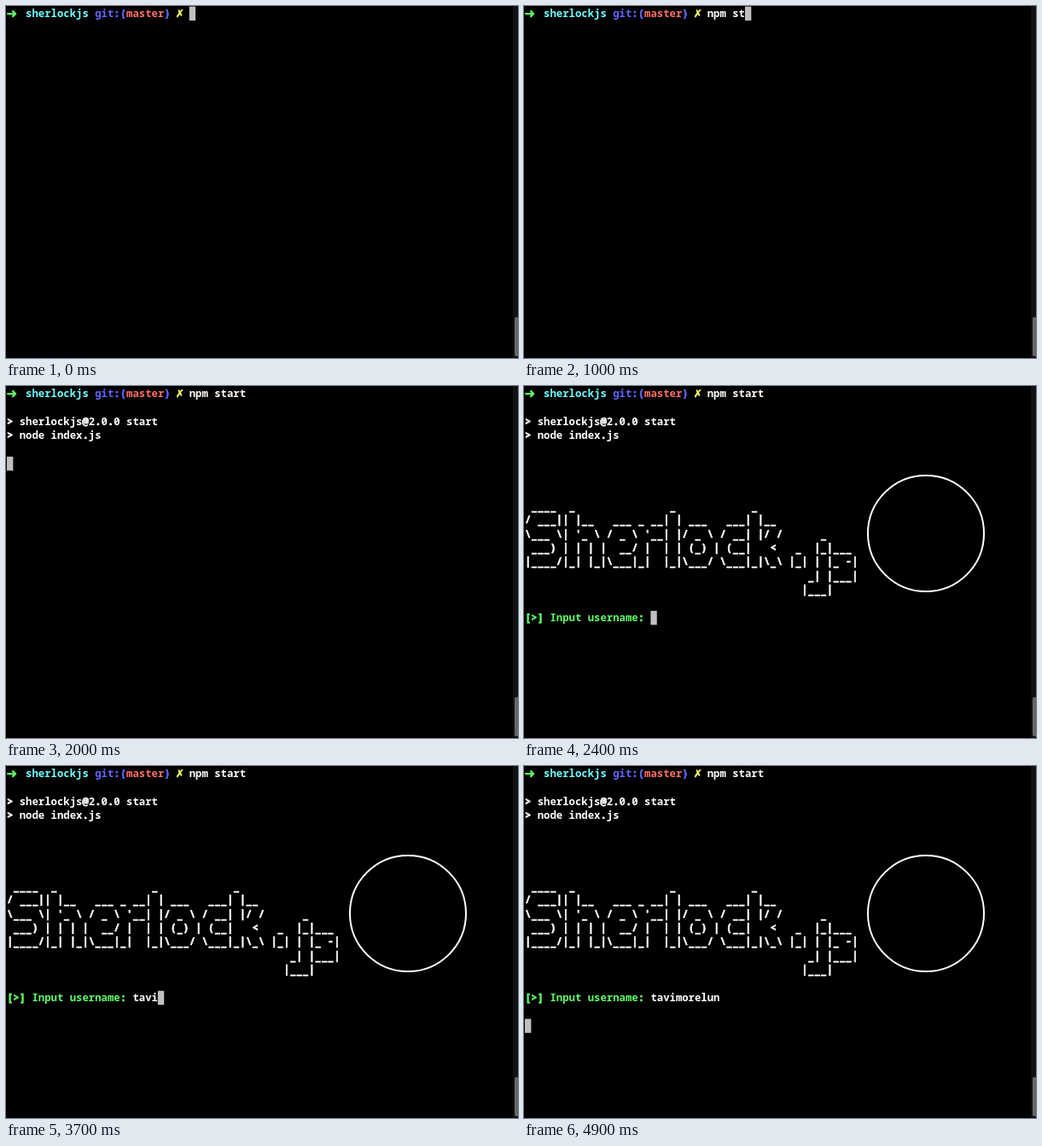
These frames come from a looping animation (600x413 px, 5000 ms). An HTML page with a canvas:

```html
<!DOCTYPE html>
<html lang="en">
<head>
<meta charset="utf-8">
<title>Terminal session</title>
<style>
  html, body { margin: 0; width: 100%; height: 100%; overflow: hidden; background: #000; }
  canvas { display: block; width: 600px; height: 413px; }
</style>
</head>
<body>
<canvas id="screen" width="600" height="413"></canvas>
<script>
const LOOP = 5000;
const CELL_W = 7.37, CELL_H = 16.45, LEFT = 1, TOP = 0.6, BASELINE = 12.4;
const MONO = '"Noto Sans Mono", "DejaVu Sans Mono", monospace';
const SYMBOL = '"DejaVu Sans", sans-serif';
const COLOR = {
  white: '#fff', green: '#5ffa68', cyan: '#6ffdff', blue: '#6266ff',
  red: '#ff6e67', yellow: '#fefb67', cursor: '#c0c0c0'
};

const COMMAND = 'npm start';
const COMMAND_TIMES = [500, 600, 700, 800, 900, 1000, 1100, 1200, 1300];
const COMMAND_ENTER = 1600;
const HEADER_AT = 2000, BANNER_AT = 2200;
const USERNAME = 'tavimorelun';
const USERNAME_TIMES = [3200, 3300, 3500, 3600, 3800, 3900, 4000, 4200, 4300, 4400, 4500];
const USERNAME_ENTER = 4700;

const TITLE = String.raw`
 ____  _               _            _
/ ___|| |__   ___ _ __| | ___   ___| |__
\___ \| '_ \ / _ \ '__| |/ _ \ / __| |/ /
 ___) | | | |  __/ |  | | (_) | (__|   <
|____/|_| |_|\___|_|  |_|\___/ \___|_|\_\
`.split('\n').slice(1, -1);

const SUFFIX = String.raw`
     _
 _  |_|___
|_| | |_ -|
   _| |___|
  |___|
`.split('\n').slice(1, -1);

const ctx = document.getElementById('screen').getContext('2d');
ctx.lineJoin = 'round';
const cellX = col => LEFT + col * CELL_W;
const cellY = row => TOP + row * CELL_H;

// A non-zero weight thickens the glyph with an outline.
function glyph(ch, x, y, font, { align = 'center', weight = 0 } = {}) {
  ctx.font = font;
  ctx.textAlign = align;
  ctx.fillText(ch, x, y);
  if (!weight) return;
  ctx.strokeStyle = ctx.fillStyle;
  ctx.lineWidth = weight;
  ctx.strokeText(ch, x, y);
}

// Each character sits in its own cell; underscores are lower and keep a small gap.
function print(row, col, text, color = COLOR.white) {
  ctx.fillStyle = color;
  [...text].forEach((ch, i) => {
    if (ch === ' ') return;
    const low = ch === '_';
    const weight = /[a-z0-9]/i.test(ch) ? 0 : 0.6;
    glyph(ch, cellX(col + i + 0.5), cellY(row) + BASELINE + (low ? 1 : 0),
      `600 ${low ? 10 : 12.3}px ${MONO}`, { weight });
  });
}

function cursor(row, col) {
  ctx.fillStyle = COLOR.cursor;
  ctx.fillRect(cellX(col), cellY(row), CELL_W, CELL_H);
}

function typed(text, times, t) {
  return text.slice(0, times.filter(time => time <= t).length);
}

function drawScrollbar() {
  ctx.fillStyle = '#111';
  ctx.fillRect(594, 0, 6, 413);
  ctx.fillStyle = '#666';
  ctx.beginPath();
  ctx.roundRect(596, 365, 5, 46, 2);
  ctx.fill();
}

function drawPrompt() {
  ctx.fillStyle = COLOR.green;
  glyph('➜', LEFT - 0.5, cellY(0) + BASELINE + 0.5, `bold 15px ${SYMBOL}`, { align: 'left', weight: 0.6 });
  print(0, 3, 'sherlockjs', COLOR.cyan);
  print(0, 14, 'git:(', COLOR.blue);
  print(0, 19, 'master', COLOR.red);
  print(0, 25, ')', COLOR.blue);
  ctx.fillStyle = COLOR.yellow;
  glyph('✗', cellX(27.5), cellY(0) + BASELINE, `bold 12px ${SYMBOL}`, { weight: 0.6 });
}

function drawBanner() {
  TITLE.forEach((line, i) => print(8 + i, 0, line));
  SUFFIX.forEach((line, i) => print(10 + i, 42, line));
  ctx.strokeStyle = COLOR.white;
  ctx.lineWidth = 2;
  ctx.beginPath();
  ctx.arc(471, 173, 68, 0, Math.PI * 2);
  ctx.stroke();
}

function draw(t) {
  ctx.fillStyle = '#000';
  ctx.fillRect(0, 0, 600, 413);
  drawScrollbar();
  drawPrompt();

  const command = typed(COMMAND, COMMAND_TIMES, t);
  print(0, 29, command);
  if (t < COMMAND_ENTER) return cursor(0, 29 + command.length);
  if (t < HEADER_AT) return cursor(1, 0);

  print(2, 0, '> sherlockjs@2.0.0 start');
  print(3, 0, '> node index.js');
  if (t < BANNER_AT) return cursor(5, 0);

  drawBanner();
  print(16, 0, '[>] Input username:', COLOR.green);
  const username = typed(USERNAME, USERNAME_TIMES, t);
  print(16, 20, username);
  if (t < USERNAME_ENTER) cursor(16, 20 + username.length);
  else cursor(18, 0);
}

const start = performance.now();
function tick() {
  draw((performance.now() - start) % LOOP);
  requestAnimationFrame(tick);
}
tick();
</script>
</body>
</html>
```
